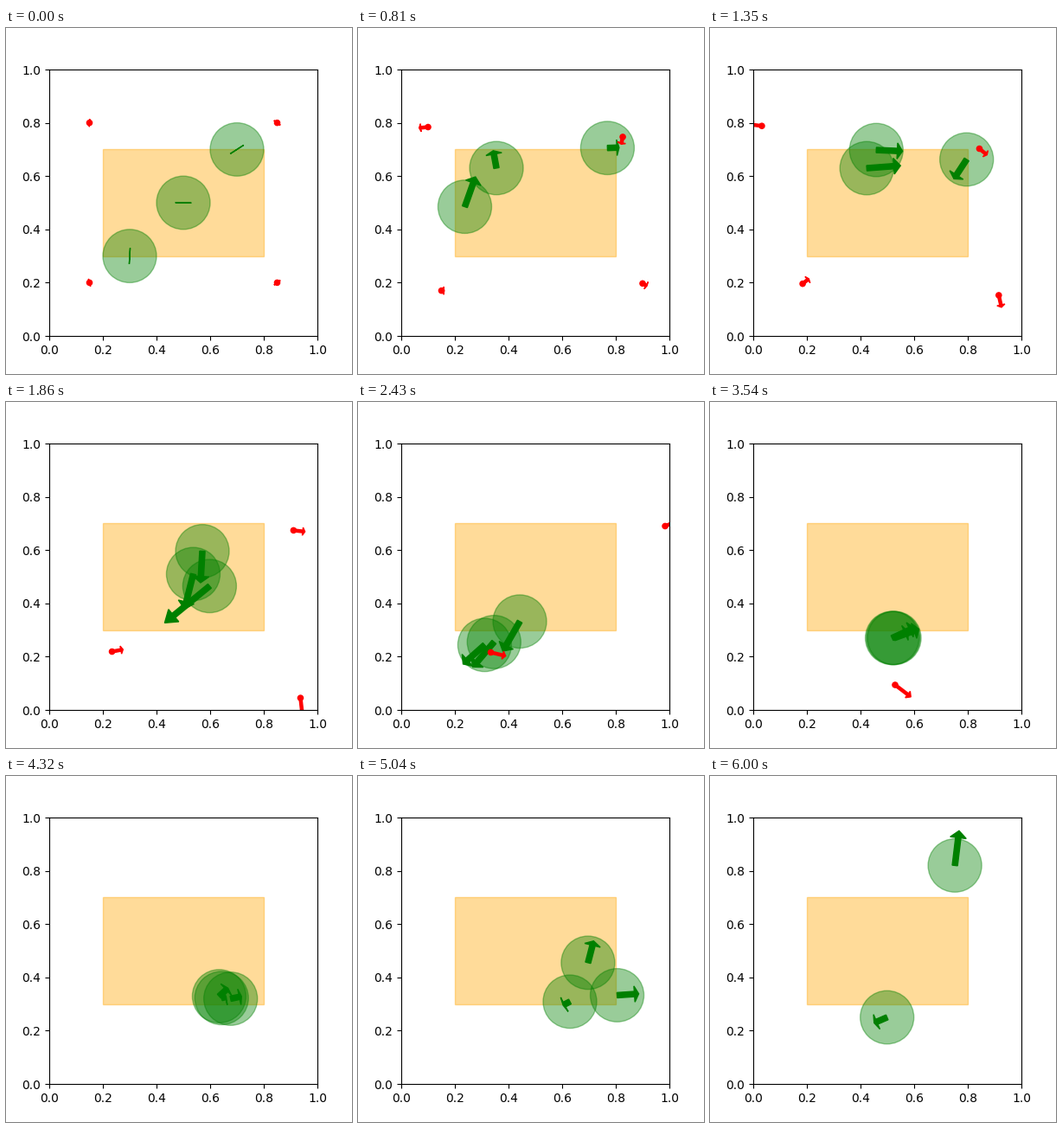
These frames come from a looping animation (400 px wide and 400 px high, 6.03 s). A matplotlib script:

```python
from itertools import product

import numpy as np
import matplotlib.pyplot as plt
from matplotlib.animation import FuncAnimation
from matplotlib.patches import Arrow, Circle, Rectangle

DT = 0.1
FRAMES = 201
KNOTS = DT * np.array([0, 26, 43.5, 61, 80, 117, 167, 199])
MEET = np.array([.522, .27])

# Places each agent passes after its start; the hunters meet on the way.
HUNTS = [
    [(.237, .485), (.417, .629), (.537, .51), (.346, .255)],
    [(.355, .63), (.454, .698), (.571, .596), (.442, .332)],
    [(.769, .7055), (.798, .666), (.598, .465), (.311, .244)],
]
PARTINGS = [
    [(.629, .309), (.499, .25)],
    [(.6965, .455), (.752, .82)],
    [(.805, .333), (1.18, .36)],
]
ESCAPES = [
    [(.15, .17), (.183, .195), (.234, .219), (.334, .216), (.529, .094),
     (.89, -.15)],
    [(.1, .784), (.034, .788)],
    [(.9, .197), (.915, .155), (.937, .045), (.937, -.11)],
    [(.826, .747), (.842, .704), (.911, .674), (.984, .69)],
]


class Path:
    """Cubic spline that starts at rest, ends straight, then coasts."""

    def __init__(self, points):
        self.p = np.array(points, float)
        n = len(self.p)
        self.t = KNOTS[:n]
        self.h = h = np.diff(self.t)
        self.slope = s = np.diff(self.p, axis=0) / h[:, None]
        a, b = np.eye(n), np.zeros((n, 2))
        for i in range(1, n - 1):
            a[i, i - 1:i + 2] = h[i], 2 * (h[i - 1] + h[i]), h[i - 1]
            b[i] = 3 * (h[i] * s[i - 1] + h[i - 1] * s[i])
        a[-1, -2], b[-1] = .5, 1.5 * s[-1]
        self.v = np.linalg.solve(a, b)

    def at(self, time):
        """Position and velocity."""
        if time >= self.t[-1]:
            return self.p[-1] + self.v[-1] * (time - self.t[-1]), self.v[-1]
        i = np.searchsorted(self.t, time, side="right") - 1
        h, s = self.h[i], self.slope[i]
        d = time - self.t[i]
        v, w = self.v[i], self.v[i + 1]
        c2 = (3 * s - 2 * v - w) / h
        c3 = (v + w - 2 * s) / h ** 2
        pos = self.p[i] + d * (v + d * (c2 + d * c3))
        return pos, v + d * (2 * c2 + 3 * d * c3)


class Agent:
    def __init__(self, ax, points, radius, width, color, alpha=None):
        self.path = Path(points)
        self.body = ax.add_patch(
            Circle(points[0], radius, color=color, alpha=alpha))
        self.arrow = ax.add_patch(
            Arrow(*points[0], 0, 0, width=width, color=color, snap=False))

    def move(self, time):
        (x, y), (vx, vy) = self.path.at(time)
        self.body.center = x, y
        self.arrow.set_data(x=x, y=y, dx=vx, dy=vy)


fig, ax = plt.subplots(figsize=(4, 4), dpi=100)
ax.set_xlim(0, 1)
ax.set_ylim(0, 1)
ax.add_patch(Rectangle((.2, .3), .6, .4, color="orange", alpha=.4))

agents = []
for i, (hunt, parting) in enumerate(zip(HUNTS, PARTINGS)):
    start = (.3 + .2 * i,) * 2
    meet = MEET + (.004 * (i - 1), 0)
    agents.append(Agent(ax, [start, *hunt, meet, *parting],
                        .1, .1, "green", .4))
for corner, escape in zip(product((.15, .85), (.2, .8)), ESCAPES):
    agents.append(Agent(ax, [corner, *escape], .01, .05, "red"))


def update(frame):
    for agent in agents:
        agent.move(DT * max(frame - 1, 0))
    return []


anim = FuncAnimation(fig, update, frames=FRAMES, interval=30,
                     repeat=True, repeat_delay=0, blit=False)
plt.show()
```
